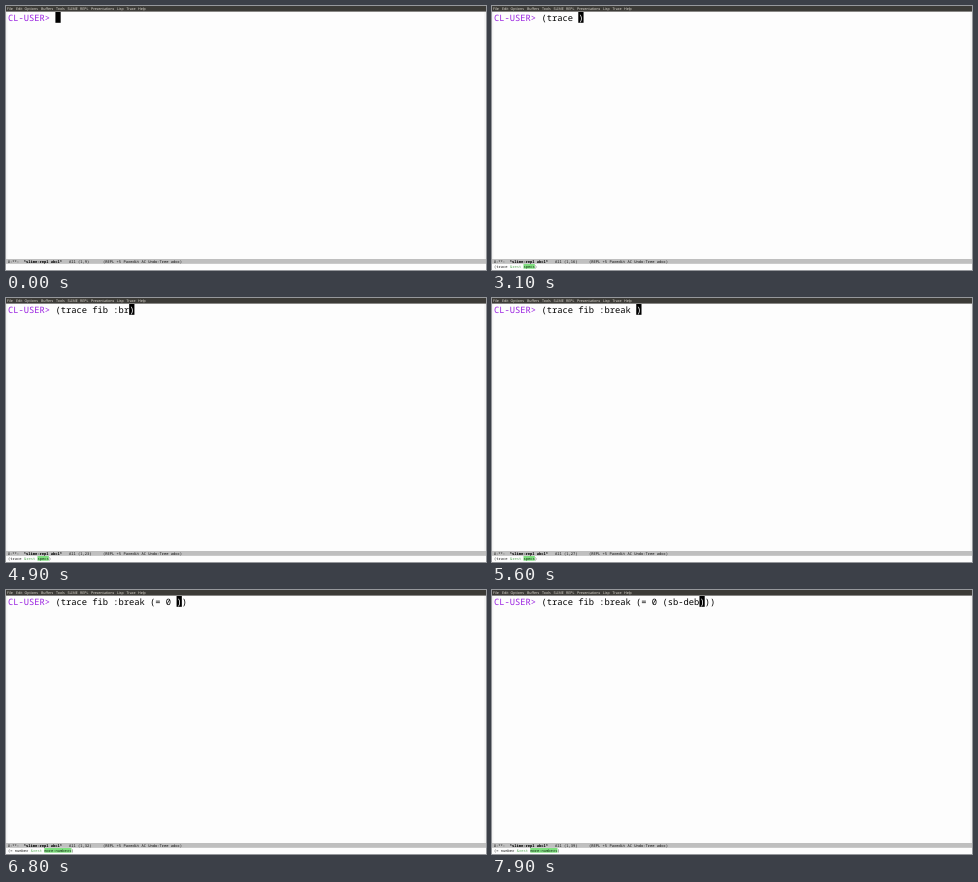
An HTML page with a canvas for the animation above (8000 ms loop, 480 by 264 pixels).

```html
<!DOCTYPE html>
<html lang="en">
<head>
<meta charset="utf-8">
<title>Typing a trace form in a Lisp REPL</title>
<style>
html, body { margin: 0; width: 100%; height: 100%; overflow: hidden; background: #fdfdfd; }
canvas { display: block; width: 480px; height: 264px; }
</style>
</head>
<body>
<canvas id="stage"></canvas>
<script>
const W = 480, H = 264, LOOP = 8000;
const canvas = document.getElementById('stage');
const ctx = canvas.getContext('2d');
const dpr = window.devicePixelRatio || 1;
canvas.width = W * dpr;
canvas.height = H * dpr;

const MONO = '"Noto Sans Mono", "DejaVu Sans Mono", monospace';
const SANS = '"Noto Sans", "Open Sans", sans-serif';
const CELL = 5.268, SMALL = 2.268;      // character widths, 0.6 em
const BIG_FONT = `${CELL / 0.6}px ${MONO}`;
const SMALL_FONT = `${SMALL / 0.6}px ${MONO}`;
const PROMPT = 'CL-USER> ';
const INPUT = '(trace fib :break (= 0 (sb-deb';

const MENU = [
  ['File', 1], ['Edit', 10], ['Options', 18.5], ['Buffers', 35], ['Tools', 50],
  ['SLIME', 61.5], ['REPL', 74], ['Presentations', 85], ['Lisp', 111],
  ['Trace', 120.5], ['Help', 132]
];

// Time of each key press, in ms
const KEYS = [
  2100, 2300, 2400, 2600, 2700, 2800, 2900,
  3300, 3500, 3700, 3900,
  4500, 4800, 4900, 5000, 5200, 5300, 5500,
  5800, 6000, 6200, 6400, 6600,
  6900, 7000, 7200, 7300, 7500, 7700, 7900
];

function rect(color, x, y, w, h) {
  ctx.fillStyle = color;
  ctx.fillRect(x, y, w, h);
}

function text(str, x, y, color, font) {
  ctx.font = font;
  ctx.fillStyle = color;
  ctx.fillText(str, x, y);
}

function drawMenu() {
  rect('#3c3b37', 0, 0, W, 5.6);
  for (const [label, x] of MENU) text(label, x, 4.2, '#dfdbd2', `3.6px ${SANS}`);
}

function drawInput(typed) {
  const x0 = 2, base = 14.8;
  const x = x0 + PROMPT.length * CELL;
  const cursorX = x + typed.length * CELL;
  const depth = typed.split('(').length - 1;
  text(PROMPT, x0, base, '#9a22e0', BIG_FONT);
  text(typed, x, base, '#000', BIG_FONT);
  rect('#000', cursorX, 6, CELL, 10.8);
  if (depth) {
    text(')', cursorX, base, '#fff', BIG_FONT);
    text(')'.repeat(depth - 1), cursorX + CELL, base, '#000', BIG_FONT);
  }
}

function drawModeLine(column) {
  const x = 1.8, base = 256.6;
  rect('#bfbfbf', 0, 253, W, 4.8);
  text('U:**-', x, base, '#111', SMALL_FONT);
  text('*slime-repl abcl*', x + 7 * SMALL, base, '#000', 'bold ' + SMALL_FONT);
  text(`All (1,${column})`, x + 27 * SMALL, base, '#111', SMALL_FONT);
  text('(REPL +5 Paredit AC Undo-Tree adoc)', x + 42 * SMALL, base, '#111', SMALL_FONT);
}

function drawHint(head, rest) {
  const base = 261.5;
  let x = 2;
  text(head, x, base, '#222', SMALL_FONT);
  x += head.length * SMALL;
  text('&rest', x, base, '#5fae5f', SMALL_FONT);
  x += 6 * SMALL;
  rect('#80e080', x, 258, rest.length * SMALL, 4.7);
  text(rest, x, base, '#153015', SMALL_FONT);
  text(')', x + rest.length * SMALL, base, '#222', SMALL_FONT);
}

function draw(t) {
  const count = KEYS.filter(k => k <= t).length;
  const typed = INPUT.slice(0, count);
  ctx.setTransform(dpr, 0, 0, dpr, 0, 0);
  ctx.textRendering = 'geometricPrecision';
  rect('#fdfdfd', 0, 0, W, H);
  rect('#f2f2f2', 0, 5.6, 1.4, 247.4);
  rect('#f2f2f2', 478.4, 5.6, 1.6, 247.4);
  drawMenu();
  drawInput(typed);
  drawModeLine(PROMPT.length + count);
  if (typed.includes('(= ')) drawHint('(= number ', 'more-numbers');
  else if (typed.includes('(trace ')) drawHint('(trace ', 'specs');
}

const start = performance.now();
function tick() {
  draw((performance.now() - start) % LOOP);
  requestAnimationFrame(tick);
}
tick();
</script>
</body>
</html>
```
